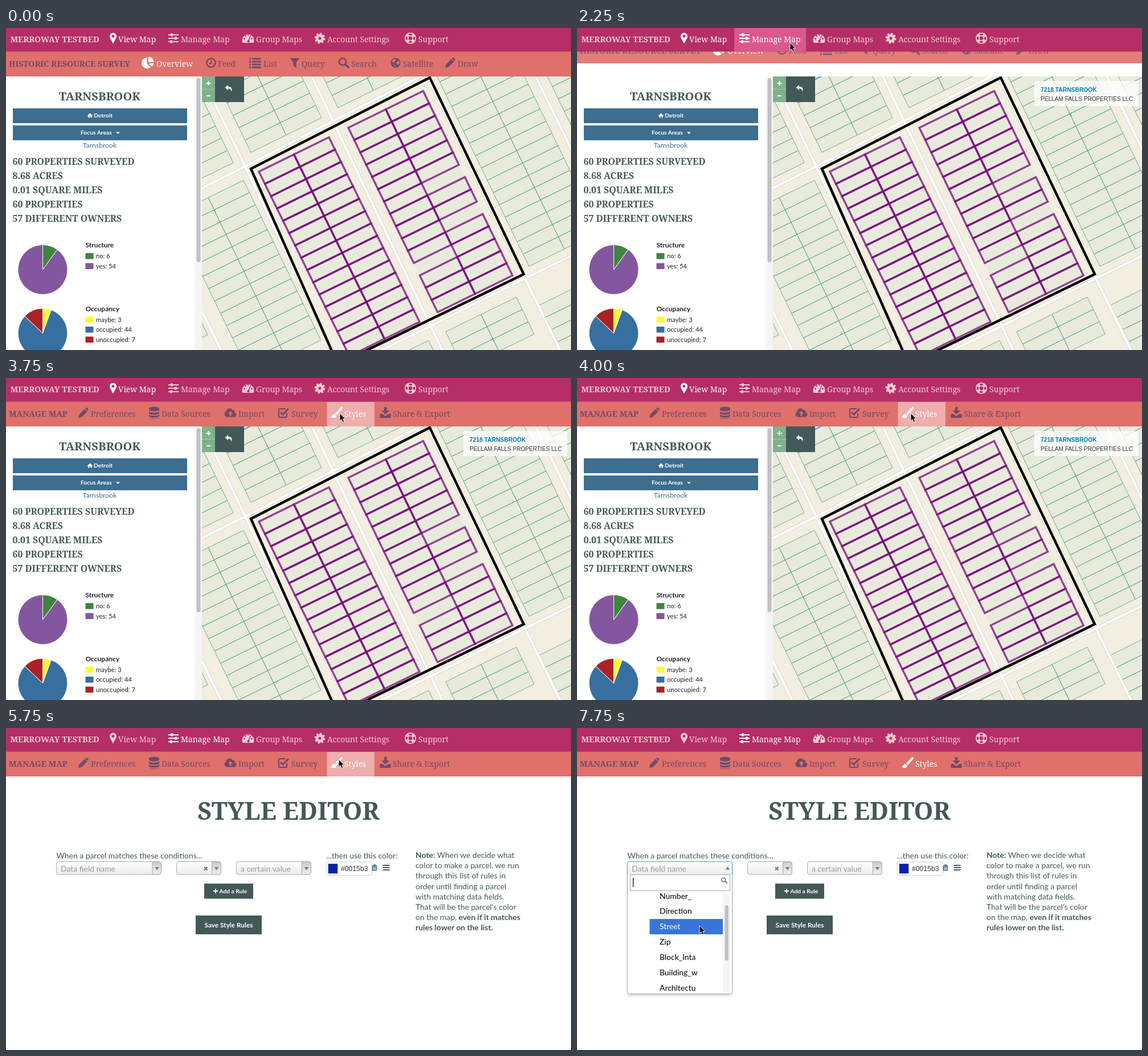
These frames come from a looping animation (992 px wide and 565 px high, 8 s). An HTML page:

```html
<!DOCTYPE html>
<html lang="en">
<head>
<meta charset="utf-8">
<title>Parcel map styles</title>
<style>
html, body { margin: 0; width: 100%; height: 100%; overflow: hidden; background: #fff; }
#stage { display: block; width: 992px; height: 565px; font-family: Lato, sans-serif; }
.slab { font-family: "Noto Serif", serif; }
.nav text { fill: currentColor; font: 13.9px "Noto Serif", serif; }
.nav .title { font-size: 14.2px; font-weight: 600; }
.icon { fill: currentColor; fill-rule: evenodd; }
.line { fill: none; stroke: currentColor; }
.b { font-weight: 700; }
</style>
</head>
<body>
<svg id="stage" viewBox="0 0 992 565"></svg>
<script>
const DARK = '#435957', BLUE = '#3d6e8f', PINK = '#f5cbd2', PLUM = '#704a68';

const text = (x, y, s, size, fill, extra = '') =>
  `<text x="${x}" y="${y}" font-size="${size}" fill="${fill}" ${extra}>${s}</text>`;
const rect = (x, y, w, h, fill, extra = '') =>
  `<rect x="${x}" y="${y}" width="${w}" height="${h}" fill="${fill}" ${extra}/>`;
const path = (d, extra = '') => `<path d="${d}" ${extra}/>`;
const line = (d, w) => path(d, `class="line" stroke-width="${w}"`);
const ring = (r, w, extra = '') => `<circle r="${r}" class="line" stroke-width="${w}" ${extra}/>`;
const hole = (x, y, r) => `M${x - r} ${y}a${r} ${r} 0 1 0 ${2 * r} 0a${r} ${r} 0 1 0 ${-2 * r} 0z`;
const MID = 'text-anchor="middle"';

const icons = {
  pin: path('M0-9.5a6 6 0 0 1 6 6c0 4-4 8-6 13c-2-5-6-9-6-13a6 6 0 0 1 6-6z' + hole(0, -3.5, 2.4)),
  sliders: line('M-9-6H9M-9 0H9M-9 6H9', 2) + line('M-3-8.5v5M4-2.5v5M-4 3.5v5', 4),
  gauge: path('M-9.5 8a10.5 10.5 0 1 1 19 0z' + hole(-6.5, 1, 1.4) + hole(-4.5, -4, 1.4) +
    hole(0, -6, 1.4) + hole(6.5, 1, 1.4) + 'M4-5l1.2.6L2 3.5a2.2 2.2 0 1 1-1.5-.5z'),
  gear: ring(5, 5) + ring(8, 3, 'stroke-dasharray="3.14"'),
  ring: ring(9.2, 1.8) + ring(4.2, 1.6) + ring(6.7, 4.5, 'stroke-dasharray="5.26" transform="rotate(22.5)"'),
  pie: path('M-1.5-9A9.5 9.5 0 1 0 5 7.5L-1.5 1zM1-10.5A9.5 9.5 0 0 1 10.5-1H1zM1.5 1H10.5A9.5 9.5 0 0 1 7 7z'),
  clock: ring(7.6, 2.5) + line('M.5-4.5V1H-3.5', 1.8),
  list: line('M-10-7h3M-10-2h3M-10 3h3M-10 8h3M-5-7H10.5M-5-2H10.5M-5 3H10.5M-5 8H10.5', 3),
  filter: path('M-8.5-8H8.5L2.5-1V9L-2.5 5V-1z'),
  search: '<g transform="translate(-2-2)">' + ring(6.2, 2.8) + '</g>' + line('M2.5 2.5L9 9', 3.6),
  globe: path(hole(0, 0, 8.6) + 'M-5-5l4-2 2 2-3 3-1 3-3-2zM3-3l4 0 0 4-3 3-3-3zM-3 3l3 1-1 3z'),
  pencil: path('M-9 9L-7.5 3L2-6.5L6.5-2L-3 7.5zM3-7.5L5.5-9.5L9-6L7.5-3z'),
  database: path('M-9-7.5c0-4 18-4 18 0v2c0 4-18 4-18 0zM-9-2.5c3 3 15 3 18 0v3c0 4-18 4-18 0z' +
    'M-9 3c3 3 15 3 18 0v2.5c0 4-18 4-18 0zM-9 8c3 3 15 3 18 0v.5c0 3-18 3-18 0z'),
  cloud: path('M-6 7.5a5 5 0 0 1-1.5-9.5a6 6 0 0 1 11-3a3.5 3.5 0 0 1 4 4a4.5 4.5 0 0 1-.5 8.5z' +
    'M0-3l-4.5 4.5h3V5.5h3V1.5h3z'),
  check: line('M6 1V6a2 2 0 0 1-2 2H-6a2 2 0 0 1-2-2V-5a2 2 0 0 1 2-2H4', 2) + line('M-5-1L-1 3L9-7', 3),
  brush: path('M10-10c2 1 0 4-1 5L1 4L-2 1L6-7.5C7-9 9-10.5 10-10zM-3 2L0 5C0 10-6 10-10 7.5C-7 7-8 2-3 2z'),
  download: path('M-2-10h4.5v6H7L0 3-6.5-4H-2zM-9.5 2h4l5.5 4 5.5-4h4v7h-19z'),
  home: path('M0-5L6 .5 5 1.5 4 .8V5H1.2V2H-1.2V5H-4V.8L-5 1.5-6 .5z'),
  reply: path('M-6.5-1.5L-1-6V-3.2C5-3.2 7 1 4.5 6C4.5 2 3 .5-1 .5V3.2z'),
  trash: path('M-4.5-4h2.5v-1.5h4V-4h2.5v1.5h-9zM-4-2h8v7.5h-8zM-2.2-.8v5h1v-5zM-.5-.8v5h1v-5zM1.2-.8v5h1v-5z'),
};
const icon = (name, x, y, color = 'currentColor', scale = 1) =>
  `<g class="icon" color="${color}" transform="translate(${x} ${y}) scale(${scale})">${icons[name]}</g>`;

// Navigation items: id, icon, icon x, label x, label
const item = (y, color) => ([id, name, ix, tx, label]) =>
  `<g id="${id}" color="${color}">${icon(name, ix, y - 7)}<text x="${tx}" y="${y}">${label}</text></g>`;
const topItems = [
  ['view', 'pin', 188, 197, 'View Map'], ['manage', 'sliders', 294, 307, 'Manage Map'],
  ['group', 'gauge', 425, 439, 'Group Maps'], ['account', 'gear', 551, 564, 'Account Settings'],
  ['support', 'ring', 710, 724, 'Support']];
const surveyItems = [
  ['overview', 'pie', 249, 264, 'Overview'], ['feed', 'clock', 360, 372, 'Feed'],
  ['list', 'list', 437, 452, 'List'], ['query', 'filter', 507, 519, 'Query'],
  ['search', 'search', 593, 606, 'Search'], ['satellite', 'globe', 684, 697, 'Satellite'],
  ['draw', 'pencil', 780, 793, 'Draw']];
const manageItems = [
  ['prefs', 'pencil', 136, 149, 'Preferences'], ['data', 'database', 260, 273, 'Data Sources'],
  ['import', 'cloud', 394, 408, 'Import'], ['survey', 'check', 487, 501, 'Survey'],
  ['styles', 'brush', 580, 594, 'Styles'], ['share', 'download', 666, 679, 'Share &amp; Export']];
const bar = (x, y, title, items, color) =>
  `<text class="title" x="${x}" y="${y}" color="${color}">${title}</text>${items.map(item(y, color)).join('')}`;
const subBar = (id, title, items, hover) =>
  `<g id="${id}" class="nav">${rect(0, 41, 992, 44, '#e0706b')}${hover}${bar(5, 68, title, items, PLUM)}</g>`;

// Land blocks: two columns of parcels of total width w, each row shifted by dx
function block(x, y, rows, style, w = 124, skip = [], dx = 10.45) {
  const at = (c, r) => `${x + c * w / 2 + dx * r} ${y - c * w * .245 + 21.58 * r}`;
  const cell = (c, r, c2, r2) => `M${at(c, r)}L${at(c2, r)}L${at(c2, r2)}L${at(c, r2)}z`;
  let out = path(cell(0, 0, 2, rows), 'fill="#e8ebdc"');
  for (let c = 0; c < 2; c++)
    for (let r = 0; r < rows; r++)
      if (!skip.includes(c * 100 + r)) out += path(cell(c, r, c + 1, r + 1), style);
  return out;
}
const GREEN = 'fill="none" stroke="#5fa48f" stroke-width=".9"';
const PURPLE = 'fill="none" stroke="#780b7d" stroke-width="3.4" stroke-opacity=".76"';
const greens = [[181, 103, 9], [346.4, 45.6, 8], [530.7, 32, 5], [751, 73, 16], [907, -5, 20],
  [293, 328, 13], [136, 405, 9], [933, 488, 5], [772, 533, 3], [618, 609, 2]];
const roads = 'M334 286L420 243 574 163 745 76M650 570L746 523 908 441 1000 396M344 85L420 243 575 570' +
  'M537 85L574 163 768 570M735 75L912 441 975 570M344 497L380 570M890 3L1000 228';
const map = `<svg id="map" x="344" y="85" width="648" height="480" viewBox="344 85 648 480">
  ${rect(344, 85, 648, 480, '#f2eee0')}
  ${greens.map(([x, y, n]) => block(x, y, n, GREEN)).join('')}
  ${path(roads, 'fill="none" stroke="#dad8d4" stroke-width="6.4"')}
  ${path(roads, 'fill="none" stroke="#fff" stroke-width="4.4"')}
  ${block(444, 252, 15, PURPLE, 123, [], 10.6)}${block(601, 175, 15, PURPLE, 131.5, [11, 106, 109])}
  ${path('M430 247L744 87 909 432 582.5 590z', 'fill="none" stroke="#000" stroke-width="4.5"')}
  <g id="tip">${path('M416 91L432 83', 'stroke="#55a9da" stroke-width="2"')}
  ${rect(803, 93, 182.5, 44, '#fff', 'rx="2" opacity=".78"')}
  <g font-family="Liberation Sans, sans-serif">${text(814, 112, '7218 TARNSBROOK', 10.3, '#0078b0', 'class="b"')}
  ${text(814, 128, 'PELLAM FALLS PROPERTIES LLC', 10.1, '#333')}</g></g></svg>`;

function pie(cx, cy, r, slices) {
  const total = slices.reduce((s, [v]) => s + v, 0);
  let a = 0;
  const at = () => `${cx + r * Math.sin(a)} ${cy - r * Math.cos(a)}`;
  return slices.map(([v, fill]) => {
    const from = at();
    a += v / total * 2 * Math.PI;
    return path(`M${cx} ${cy}L${from}A${r} ${r} 0 ${+(v > total / 2)} 1 ${at()}z`, `fill="${fill}" stroke="#fff"`);
  }).join('');
}
const legend = (y, title, rows) => text(139.5, y, title, 12, '#222', 'class="b"') +
  rows.map(([fill, label], i) => rect(139.5, y + 10 + i * 17.5, 14, 10.5, fill) +
    text(158, y + 19 + i * 17.5, label, 11.2, '#222')).join('');
const facts = ['60 PROPERTIES SURVEYED', '8.68 ACRES', '0.01 SQUARE MILES', '60 PROPERTIES', '57 DIFFERENT OWNERS'];

const mapPage = `<g id="mapPage">
  <g class="slab b">${text(164.5, 127, 'TARNSBROOK', 20.2, DARK, MID)}
  ${facts.map((s, i) => text(11.5, 240 + 25.1 * i, s, 15.9, DARK)).join('')}</g>
  ${rect(12, 141, 306, 26, BLUE)}${rect(12, 171, 306, 26, BLUE)}
  ${icon('home', 147.5, 153.5, '#fff', .8)}
  ${text(154, 157, 'Detroit', 10.3, '#fff', 'class="b"')}${text(131, 187, 'Focus Areas', 10.3, '#fff', 'class="b"')}
  ${path('M193 182.5h7l-3.5 3.5z', 'fill="#fff"')}
  ${text(164.5, 210, 'Tarnsbrook', 12.2, BLUE, MID)}
  ${pie(64.5, 424, 43.5, [[6, '#3f8440'], [54, '#84569f']])}
  ${pie(64.5, 535.5, 43.5, [[3, '#fcf93a'], [44, '#366fa0'], [7, '#ab2126']])}
  ${legend(385, 'Structure', [['#3f8440', 'no: 6'], ['#84569f', 'yes: 54']])}
  ${legend(496.5, 'Occupancy', [['#fcf93a', 'maybe: 3'], ['#366fa0', 'occupied: 44'], ['#ab2126', 'unoccupied: 7']])}
  ${rect(331, 85, 13, 480, '#f5f5f5')}${rect(334.5, 88, 7, 323, '#c1c1c1', 'rx="3.5"')}
  ${rect(344, 85, 648, 480, '#ddd')}${map}
  ${rect(363, 85, 55, 45, DARK)}${icon('reply', 391, 106, '#fff')}
  <g id="zoom">${rect(344, 85, 23, 45, '#7fb18c')}
  ${path('M344 107.5h23', 'stroke="#a5cbae"')}
  ${path('M351.5 97h8M355.5 93v8M352 119h7', 'stroke="#fff" stroke-width="2"')}</g></g>`;

// Rule editor
const select = (x, w, label, arrow) => rect(x, 234.5, w, 22.5, 'url(#soft)', 'rx="4" stroke="#aaa"') +
  path(`M${arrow} 235H${x + w - 4}q4 0 4 4V253q0 4-4 4H${arrow}z`, 'fill="url(#grip)" stroke="#aaa"') +
  path(`M${arrow + 4.5} 244h7l-3.5 5.5z`, 'fill="#777"') + text(x + 7.5, 252, label, 13.9, '#999');
const note = ['<tspan class="b">Note:</tspan> When we decide what', 'color to make a parcel, we run',
  'through this list of rules in', 'order until finding a parcel', 'with matching data fields.',
  "That will be the parcel's color", 'on the map, <tspan class="b">even if it matches</tspan>',
  '<tspan class="b">rules lower on the list.</tspan>'];
const fields = ['Number_', 'Direction', 'Street', 'Zip', 'Block_Inta', 'Building_w', 'Architectu'];
const dropdown = `<g id="dropdown">
  ${rect(88.5, 234.5, 184, 232, '#fff', 'rx="4" stroke="#aaa" filter="url(#shadow)"')}
  ${path('M88.5 257V239q0-4.5 4-4.5H268.5q4 0 4 4.5V257', 'fill="url(#soft)" stroke="#5897fb"')}
  ${text(96, 252, 'Data field name', 13.9, '#999')}${path('M261 248.5h7l-3.5-5.5z', 'fill="#777"')}
  ${rect(93.5, 257.5, 175, 28, '#fff', 'stroke="#aaa"')}${rect(98, 263, 1.2, 16, '#000')}
  <g transform="translate(258.5 267.5) scale(.58)" color="#777">${icons.search}</g>
  ${rect(256, 289, 13, 175, '#f5f5f5')}<rect id="thumb" x="259.5" width="6.5" height="97" rx="3.2" fill="#c1c1c1"/>
  <svg x="89" y="289" width="167" height="174" viewBox="89 289 167 174"><g id="options">
  ${fields.map((s, i) => `<g class="option">${rect(127.5, 281.3 + 26.9 * i, 129, 26.9, 'none')}
    ${text(145, 299.5 + 26.9 * i, s, 13.9, '#000')}</g>`).join('')}</g></svg></g>`;
const stylePage = `<g id="stylePage">${rect(0, 85, 992, 480, '#fff')}
  ${text(496, 161, 'STYLE EDITOR', 43, DARK, MID + ' class="slab" font-weight="900"')}
  ${text(88.5, 229, 'When a parcel matches these conditions...', 13.9, DARK)}
  ${text(562, 229, '...then use this color:', 13.9, DARK)}
  ${note.map((s, i) => text(719, 228 + 18.2 * i, s, 13.9, DARK)).join('')}
  ${select(88.5, 184, 'Data field name', 257)}${select(299.5, 78, '', 361.5)}${select(404.5, 131, 'a certain value', 519.5)}
  ${path('M348 244l5.5 5.5M353.5 244l-5.5 5.5', 'stroke="#777" stroke-width="2"')}
  ${rect(562, 235, 80.5, 23.5, '#fff', 'rx="3" stroke="#ccc"')}
  ${rect(566, 238.5, 16, 16.5, '#0d1fad', 'stroke="#3545a8" stroke-width=".8"')}
  ${text(588, 251, '#0015b3', 12.2, '#333', 'font-family="Liberation Sans, sans-serif"')}
  ${icon('trash', 647, 245, BLUE)}${path('M661.5 241h12M661.5 245h12M661.5 249h12', `stroke="${DARK}" stroke-width="2"`)}
  ${rect(348, 273, 86, 26.5, DARK)}${rect(333, 329, 116, 33, DARK)}
  ${path('M364 286h8M368 282v8', 'stroke="#fff" stroke-width="2"')}
  ${text(374.5, 290, 'Add a Rule', 10.2, '#fff', 'class="b"')}${text(391, 350, 'Save Style Rules', 11.8, '#fff', MID + ' class="b"')}
  ${dropdown}</g>`;

const grad = (id, a, b) => `<linearGradient id="${id}" x2="0" y2="1"><stop stop-color="${a}"/><stop offset="1" stop-color="${b}"/></linearGradient>`;
const stage = document.getElementById('stage');
stage.innerHTML = `<defs>${grad('soft', '#fff', '#ececec')}${grad('grip', '#ccc', '#eee')}
  <filter id="shadow"><feDropShadow dx="0" dy="3" stdDeviation="2" flood-opacity=".16"/></filter></defs>
  ${mapPage}${stylePage}
  ${subBar('surveyBar', 'HISTORIC RESOURCE SURVEY', surveyItems, rect(344, 42, 74, 43, '#fff', 'id="feedHover" opacity=".07"'))}
  ${subBar('manageBar', 'MANAGE MAP', manageItems, rect(563.5, 42, 83.5, 43, '#fff', 'id="stylesHover" opacity=".43"'))}
  <g class="nav">${rect(0, 0, 992, 41.5, '#b52e66')}${rect(276, 0, 126, 41.5, '#d9598f', 'id="manageHover"')}
  ${bar(7.5, 25, 'MERROWAY TESTBED', topItems, PINK)}</g>
  <path id="cursor" d="M0 0V13.5L3.1 10.7 5.2 15.6 7.7 14.5 5.6 9.7H9.8z" fill="#000" stroke="#fff" stroke-width=".9"/>`;

const $ = id => document.getElementById(id);
const show = (id, on) => $(id).setAttribute('visibility', on ? 'inherit' : 'hidden');
const tint = (id, on, off) => $(id).setAttribute('color', on ? '#fff' : off);
const slide = (id, y) => $(id).setAttribute('transform', `translate(0 ${y})`);

// Pointer stops: time, x, y
const stops = [[250, 900, 300], [500, 760, 250], [750, 600, 190], [1000, 455, 110], [1250, 386, 41],
  [1500, 380, 34], [1750, 374, 26], [3500, 470, 48], [3750, 586, 62], [4250, 585, 58], [4500, 584, 55],
  [6250, 500, 102], [6500, 340, 190], [6750, 215, 248], [7250, 213, 310], [7500, 215, 338], [7750, 215, 347]];

function draw(t) {
  const during = (a, b) => t >= a && t < b;
  const [, x, y] = stops.findLast(s => s[0] <= t) || [0, -50, -50];
  $('cursor').setAttribute('transform', `translate(${x} ${y})`);

  const editing = t >= 5750, loading = t >= 4500;
  show('mapPage', !editing);
  show('map', !loading);
  show('zoom', !loading);
  // Inner parts inherit from their page
  show('tip', t >= 250);
  show('stylePage', editing);

  const overManage = during(1500, 3500), overStyles = during(3750, 6250);
  show('manageHover', overManage);
  show('feedHover', t === 1250);
  show('stylesHover', overStyles);
  tint('view', !editing, PINK);
  tint('manage', editing || overManage, PINK);
  tint('overview', true, PLUM);
  tint('feed', t === 1250, PLUM);
  tint('styles', overStyles || editing, PLUM);

  slide('surveyBar', t < 2250 ? 0 : t < 2500 ? -23 : -90);
  $('surveyBar').setAttribute('opacity', t < 2250 ? 1 : .9);
  slide('manageBar', t < 2750 ? -90 : t < 3000 ? -20 : 0);

  show('dropdown', t >= 7000);
  const scroll = t < 7500 ? 36 : t < 7750 ? 18 : 0;
  $('options').setAttribute('transform', `translate(0 ${scroll})`);
  $('thumb').setAttribute('y', 311 - scroll * .55);
  const picked = y > 289 ? Math.floor((y - scroll - 281.3) / 26.9) : -1;
  document.querySelectorAll('.option').forEach((o, i) => {
    o.children[0].setAttribute('fill', i === picked ? '#3875d7' : 'none');
    o.children[1].setAttribute('fill', i === picked ? '#fff' : '#000');
  });
}

const start = performance.now();
let last = -1;
function tick() {
  const t = Math.floor((performance.now() - start) % 8000 / 250) * 250;
  if (t !== last) draw(last = t);
  requestAnimationFrame(tick);
}
tick();
</script>
</body>
</html>
```
